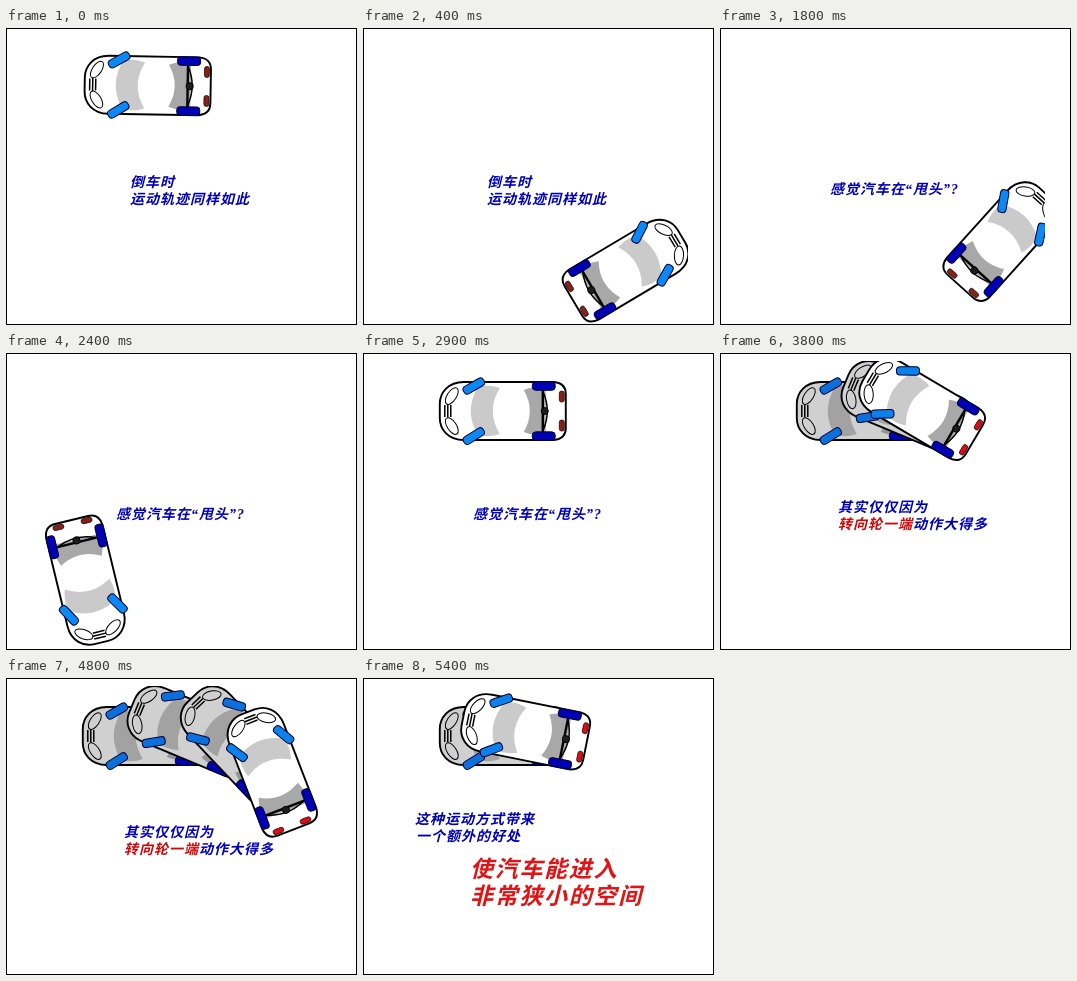
Animation, 351 px wide and 297 px high, one loop 5.8 s. Source, as an HTML page:

```html
<!DOCTYPE html>
<html lang="zh-CN">
<head>
<meta charset="utf-8">
<title>倒车轨迹</title>
<style>
  html, body { margin: 0; width: 100%; height: 100%; overflow: hidden; background: #fff; }
  svg { display: block; width: 351px; height: 297px; }
  text {
    font: italic bold 14px 'Liberation Serif', 'Noto Sans CJK SC', 'Noto Sans CJK', serif;
    letter-spacing: 1px;
    fill: #0000b8;
  }
  .red { fill: #cc0808; }
  .big { font-size: 23px; letter-spacing: 1.7px; fill: #e01414; }
  .car { --body: #fff; --front: #cacaca; --rear: #a8a8a8; --steer: #0c88f4; --lamp: #8c2018; }
  .trail .car { --steer: #0c80ec; --lamp: #e00c14; }
  .trail .ghost { --body: #d0d0d0; --front: #a2a2a2; --rear: #969696; --steer: #0c70dc; }
</style>
</head>
<body>
<svg viewBox="0 0 351 297">
  <defs>
    <clipPath id="view"><rect x="1" y="8" width="324" height="288"/></clipPath>
    <rect id="wheel" x="-11.5" y="-4.2" width="23" height="8.4" rx="3.6" stroke="#000030"/>
    <ellipse id="headlight" rx="9.5" ry="4.6" style="fill:var(--body)"/>
    <!-- Nose points left; the origin is the middle of the rear axle. -->
    <g id="car" stroke="#000" fill="none">
      <path d="M-80-29H10Q22-28 22-17V17Q22 28 10 29H-80C-96 29-104 18-104 7V-7C-104-18-96-29-80-29Z"
            style="fill:var(--body)" stroke-width="1.9"/>
      <g stroke="none">
        <path d="M-66-24Q-55-27-44-23Q-58 0-44 23Q-55 27-66 24Q-80 0-66-24Z" style="fill:var(--front)"/>
        <path d="M-20-21Q-10-25 2-25V25Q-10 25-20 21Q-8 0-20-21Z" style="fill:var(--rear)"/>
      </g>
      <use href="#headlight" transform="translate(-92 -15) rotate(-57)"/>
      <use href="#headlight" transform="translate(-92 15) rotate(57)"/>
      <path d="M-99-6V6M-96-6.5V6.5M-93-6V6" stroke-width="1.5"/>
      <path d="M-1-22V22" stroke-width="2.4"/>
      <path d="M-1-20Q8 0-1 20" stroke-width="1.5"/>
      <circle r="3.5" cx="1" fill="#182018"/>
      <g style="fill:var(--lamp)" stroke-width=".7">
        <rect x="15.5" y="-20" width="5" height="11" rx="2.3"/>
        <rect x="15.5" y="9" width="5" height="11" rx="2.3"/>
      </g>
      <use href="#wheel" y="-25" fill="#0000b4"/>
      <use href="#wheel" y="25" fill="#0000b4"/>
      <g style="fill:var(--steer)">
        <use href="#wheel" transform="translate(-70 -25) rotate(-30)"/>
        <use href="#wheel" transform="translate(-70 25) rotate(-32)"/>
      </g>
    </g>
  </defs>

  <rect width="351" height="297" fill="#fff"/>
  <g id="cars" clip-path="url(#view)"></g>

  <g class="caption">
    <text x="124" y="159">倒车时</text>
    <text x="124" y="176">运动轨迹同样如此</text>
  </g>
  <g class="caption">
    <text x="110" y="166">感觉汽车在“甩头”?</text>
  </g>
  <g class="caption">
    <text x="118" y="159">其实仅仅因为</text>
    <text x="118" y="176"><tspan class="red">转向轮一端</tspan>动作大得多</text>
  </g>
  <g class="caption">
    <text x="52" y="146">这种运动方式带来</text>
    <text x="53" y="163">一个额外的好处</text>
    <text class="big" x="107" y="199">使汽车能进入</text>
    <text class="big" x="107" y="226">非常狭小的空间</text>
  </g>
  <rect x=".5" y=".5" width="350" height="296" fill="none" stroke="#000"/>
</svg>
<script>
  const LOOP = 5800, STEP = 100;
  const CENTER = { x: 177, y: 166.5 }, RADIUS = 108.5;
  const REST = 2; // angle on the circle at which the car stands level
  const sceneStarts = [0, 1000, 3000, 4900];
  const ghostAngles = [0, 22.5, 46.5];
  // [time, degrees the car has turned]
  const turns = [
    [[0, 1], [900, 334.5], [1000, 360]],
    [[1000, 360], [1100, 360], [1800, 492], [2900, 720], [3000, 720]],
    [[3000, 0], [4900, 72.7]],
    [[4900, 0], [5000, 0], [5400, 11.3], [5800, 11.3]]
  ];

  const layer = document.getElementById('cars');
  const captions = document.querySelectorAll('.caption');

  function addCar(className) {
    const car = document.createElementNS('http://www.w3.org/2000/svg', 'use');
    car.setAttribute('href', '#car');
    car.setAttribute('class', className);
    layer.append(car);
    return car;
  }

  function place(car, angle) {
    car.setAttribute('transform',
      `translate(${CENTER.x} ${CENTER.y}) rotate(${angle + REST}) translate(0 ${-RADIUS}) rotate(${-REST})`);
  }

  function show(element, visible) {
    element.style.display = visible ? '' : 'none';
  }

  function angleAt(keys, time) {
    const i = Math.max(1, keys.findIndex(([t]) => t >= time));
    const [t0, a0] = keys[i - 1], [t1, a1] = keys[i];
    return a0 + (a1 - a0) * (time - t0) / (t1 - t0);
  }

  const ghosts = ghostAngles.map(angle => {
    const ghost = addCar('car ghost');
    place(ghost, angle);
    return ghost;
  });
  const mainCar = addCar('car');

  function draw(elapsed) {
    const time = Math.floor(elapsed % LOOP / STEP) * STEP;
    const scene = sceneStarts.filter(start => start <= time).length - 1;
    const angle = angleAt(turns[scene], time);
    const trail = scene >= 2;
    layer.classList.toggle('trail', trail);
    captions.forEach((caption, i) => show(caption, i === scene));
    ghosts.forEach((ghost, i) => show(ghost, trail && angle >= ghostAngles[i]));
    place(mainCar, angle);
  }

  const start = performance.now();
  function tick() {
    draw(performance.now() - start);
    requestAnimationFrame(tick);
  }
  tick();
</script>
</body>
</html>
```
